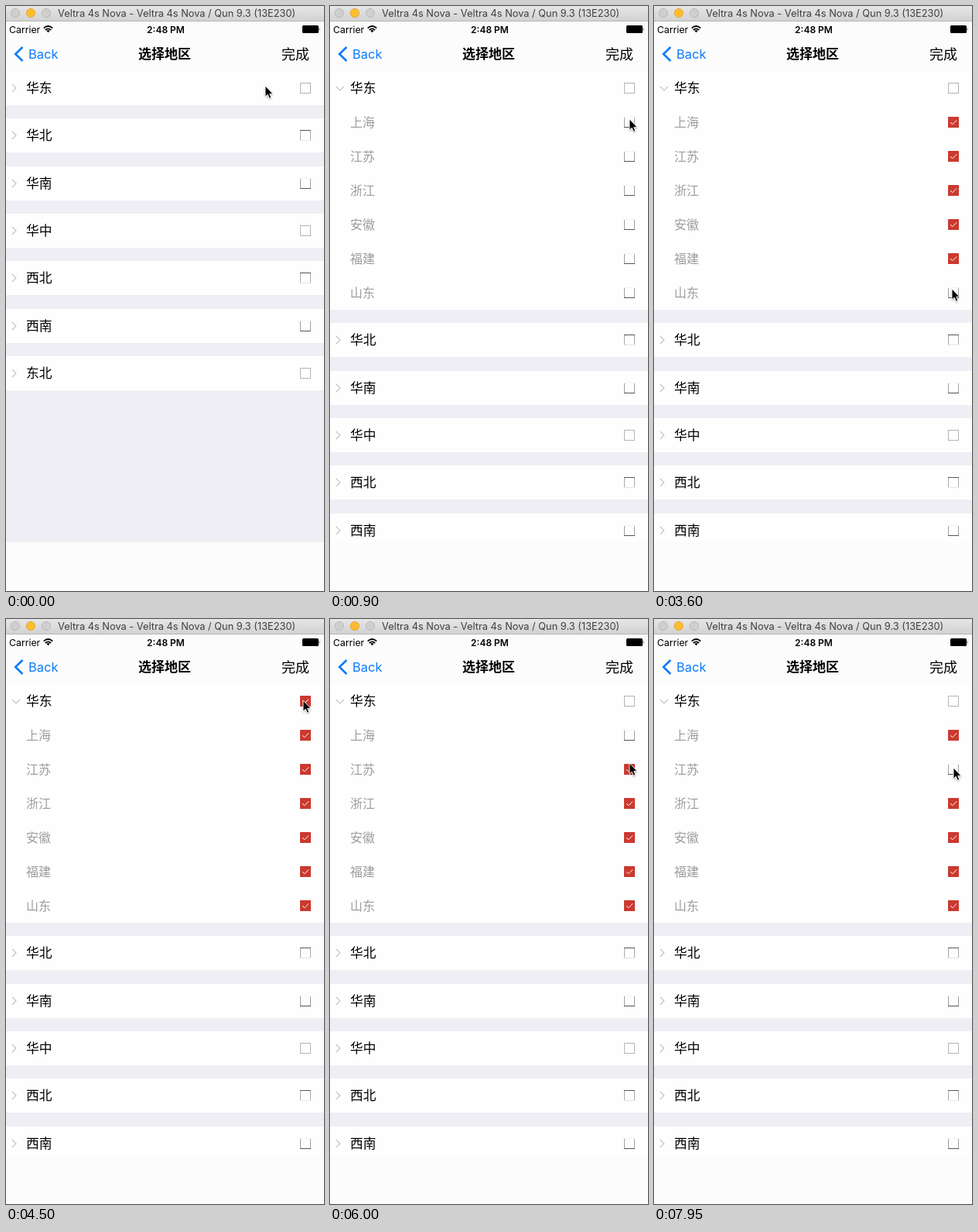
Animation, 411 px wide and 755 px high, one loop 8 s. Source, as an HTML page:

```html
<!DOCTYPE html>
<html lang="zh">
<head>
<meta charset="utf-8">
<title>选择地区</title>
<style>
  html, body { margin: 0; width: 100%; height: 100%; overflow: hidden; background: #fcfcfc; }
  svg { display: block; width: 411px; height: 755px; }
  text { font-family: Inter, "Noto Sans CJK SC", "Noto Sans CJK", sans-serif; }
  .region { font-size: 16.8px; }
  .city { font-size: 16px; font-weight: 300; fill: #9d9d9d; }
  .arrow { fill: none; stroke: #c2c2c2; stroke-width: 1.1; }
  .edge { fill: none; stroke-width: 1; }
</style>
</head>
<body>
<svg viewBox="0 0 411 755">
  <defs>
    <linearGradient id="bar" x2="0" y2="1">
      <stop stop-color="#e7e6e7"/><stop offset="1" stop-color="#d2d1d2"/>
    </linearGradient>
    <clipPath id="view"><rect y="84" width="411" height="608"/></clipPath>
    <filter id="shade" x="-50%" y="-50%" width="200%" height="200%">
      <feDropShadow dx="0" dy="1" stdDeviation="0.8" flood-opacity="0.35"/>
    </filter>
  </defs>
  <rect width="411" height="755" fill="#fcfcfc"/>

  <rect width="411" height="20" fill="url(#bar)"/>
  <path d="M0 19.5H411" stroke="#b8b7b8"/>
  <g stroke-width="0.8">
    <circle cx="12" cy="9" r="5.6" fill="#d0cfd0" stroke="#b4b3b4"/>
    <circle cx="32" cy="9" r="5.6" fill="#fdbd2f" stroke="#dfa023"/>
    <circle cx="52" cy="9" r="5.6" fill="#d0cfd0" stroke="#b4b3b4"/>
  </g>
  <text x="67" y="14" font-size="12.8" fill="#3f3f3f">Veltra 4s Nova - Veltra 4s Nova / Qun 9.3 (13E230)</text>

  <text x="4" y="35" font-size="12.3">Carrier</text>
  <g fill="none" stroke="#000" stroke-width="1.7">
    <path d="M48.7 28.6Q54.5 23.4 60.3 28.6M50.8 31Q54.5 27.6 58.2 31"/>
    <path d="M52.4 31.9Q54.5 30.2 56.6 31.9L54.5 34.2Z" fill="#000" stroke="none"/>
  </g>
  <text x="206.5" y="35" font-size="12" font-weight="600" text-anchor="middle">2:48 PM</text>
  <rect x="383" y="25" width="21" height="10" rx="1.5"/>
  <path d="M404.8 28Q406.6 30 404.8 32Z"/>

  <path d="M21.5 53L12.2 62L21.5 71" fill="none" stroke="#0f7bfb" stroke-width="2.6"/>
  <text x="29" y="68" font-size="16.5" fill="#0f7bfb">Back</text>
  <text x="205" y="68.3" font-size="17" font-weight="700" text-anchor="middle">选择地区</text>
  <text x="356" y="68.5" font-size="18">完成</text>

  <g id="list" clip-path="url(#view)"></g>
  <path id="cursor" d="M0 0V14.2L3.2 11.2L5.4 16.2L7.8 15.2L5.7 10.4H10Z"
        stroke="#fff" stroke-width="0.9" filter="url(#shade)"/>
</svg>
<script>
const LOOP = 8000, STEP = 150, ROW = 44;
const regions = ['华东', '华北', '华南', '华中', '西北', '西南', '东北'];
const cities = ['上海', '江苏', '浙江', '安徽', '福建', '山东'];

// time, x, y of the pointer tip
const path = [
  [0, 335, 103], [300, 335, 104], [750, 384, 142], [900, 387, 146], [1200, 387, 147],
  [1500, 387, 189], [1800, 387, 191], [2100, 386, 231], [2250, 386, 232], [2550, 386, 277],
  [2700, 386, 278], [3000, 386, 324], [3150, 386, 328], [3450, 385, 364], [3750, 384, 366],
  [4050, 391, 200], [4200, 384, 117], [4500, 384, 105], [5100, 384, 105], [5550, 387, 144],
  [5700, 387, 147], [6000, 387, 186], [6300, 387, 187], [6450, 387, 191], [6900, 387, 152],
  [7200, 387, 150], [7500, 387, 108], [7950, 387, 192]
];
// time, city index (-1 for the whole region)
const taps = [
  [1050, 0], [1650, 1], [2250, 2], [2700, 3], [3150, 4], [3750, 5],
  [4800, -1], [5100, -1], [5700, 0], [6300, 1], [7200, 0]
];

function add(parent, tag, attrs = {}, label = '') {
  const el = document.createElementNS('http://www.w3.org/2000/svg', tag);
  for (const key in attrs) el.setAttribute(key, attrs[key]);
  el.textContent = label;
  parent.append(el);
  return el;
}

// Edge colours (top, sides, bottom) depend on the subpixel row offset.
const edges = [['#b4b4b4', '#b4b4b4', '#b4b4b4'], ['#555', '#a8a8a8', '#e4e4e4'], ['#f4f4f4', '#a0a0a0', '#555']];

function addBox(parent, y, kind) {
  const g = add(parent, 'g', { transform: `translate(380 ${y + 15})` });
  const [top, side, bottom] = edges[kind];
  add(g, 'path', { class: 'edge', stroke: side, d: 'M.5 0V14M13.5 0V14' });
  add(g, 'path', { class: 'edge', stroke: top, d: 'M0 .5H14' });
  add(g, 'path', { class: 'edge', stroke: bottom, d: 'M0 13.5H14' });
  const mark = add(g, 'g', { visibility: 'hidden' });
  add(mark, 'rect', { width: 14, height: 14, rx: 0.8, fill: '#cb392f' });
  add(mark, 'path', { class: 'edge', stroke: '#fff', 'stroke-width': 1.2, d: 'M3 7.2L5.8 9.8L11.2 4.4' });
  return mark;
}

function addRow(parent, y, label, type, kind) {
  add(parent, 'rect', { y, width: 411, height: ROW, fill: '#fefefe' });
  add(parent, 'text', { class: type, x: 26, y: y + 28.3 }, label);
  return addBox(parent, y, kind);
}

const addArrow = (parent, y, d) =>
  add(parent, 'path', { class: 'arrow', d, transform: `translate(8 ${y + 17})` });
const RIGHT = 'M0 0L5 5L0 10', DOWN = 'M0 3L5 8L10 3';

const list = document.getElementById('list');
const cursor = document.getElementById('cursor');
const allMark = addRow(list, 84, regions[0], 'region', 0);
const arrow = addArrow(list, 84, RIGHT);
const cityMarks = cities.map((name, i) => addRow(list, 128 + i * ROW, name, 'city', 2));
const rest = add(list, 'g');
add(rest, 'rect', { y: 128, width: 411, height: 700, fill: '#efeef4' });
regions.slice(1).forEach((name, i) => {
  const y = Math.round(84 + (i + 1) * 61.33);
  addRow(rest, y, name, 'region', (i + 1) % 3);
  addArrow(rest, y, RIGHT);
});

function pointerAt(t) {
  const i = path.findIndex(p => p[0] > t);
  if (i < 0) return path[path.length - 1].slice(1);
  const [t0, x0, y0] = path[i - 1], [t1, x1, y1] = path[i];
  const k = (t - t0) / (t1 - t0);
  return [x0 + (x1 - x0) * k, y0 + (y1 - y0) * k].map(Math.round);
}

function checkedAt(t) {
  const on = cities.map(() => false);
  for (const [time, i] of taps) {
    if (time > t) break;
    if (i < 0) on.fill(!on.every(Boolean));
    else on[i] = !on[i];
  }
  return on;
}

const show = (el, on) => el.setAttribute('visibility', on ? 'visible' : 'hidden');

function draw(now) {
  const t = Math.floor((now % LOOP) / STEP) * STEP;
  const k = Math.min(1, Math.max(0, (t - 50) / 300));
  const open = k * k * (3 - 2 * k);
  rest.setAttribute('transform', `translate(0 ${Math.round(open * ROW * cities.length)})`);
  arrow.setAttribute('d', t < STEP ? RIGHT : DOWN);
  const on = checkedAt(t);
  cityMarks.forEach((mark, i) => show(mark, on[i]));
  show(allMark, on.every(Boolean));
  cursor.setAttribute('transform', `translate(${pointerAt(t)})`);
}

let start;
function tick(now) {
  start ??= now;
  draw(now - start);
  requestAnimationFrame(tick);
}
draw(0);
requestAnimationFrame(tick);
</script>
</body>
</html>
```
